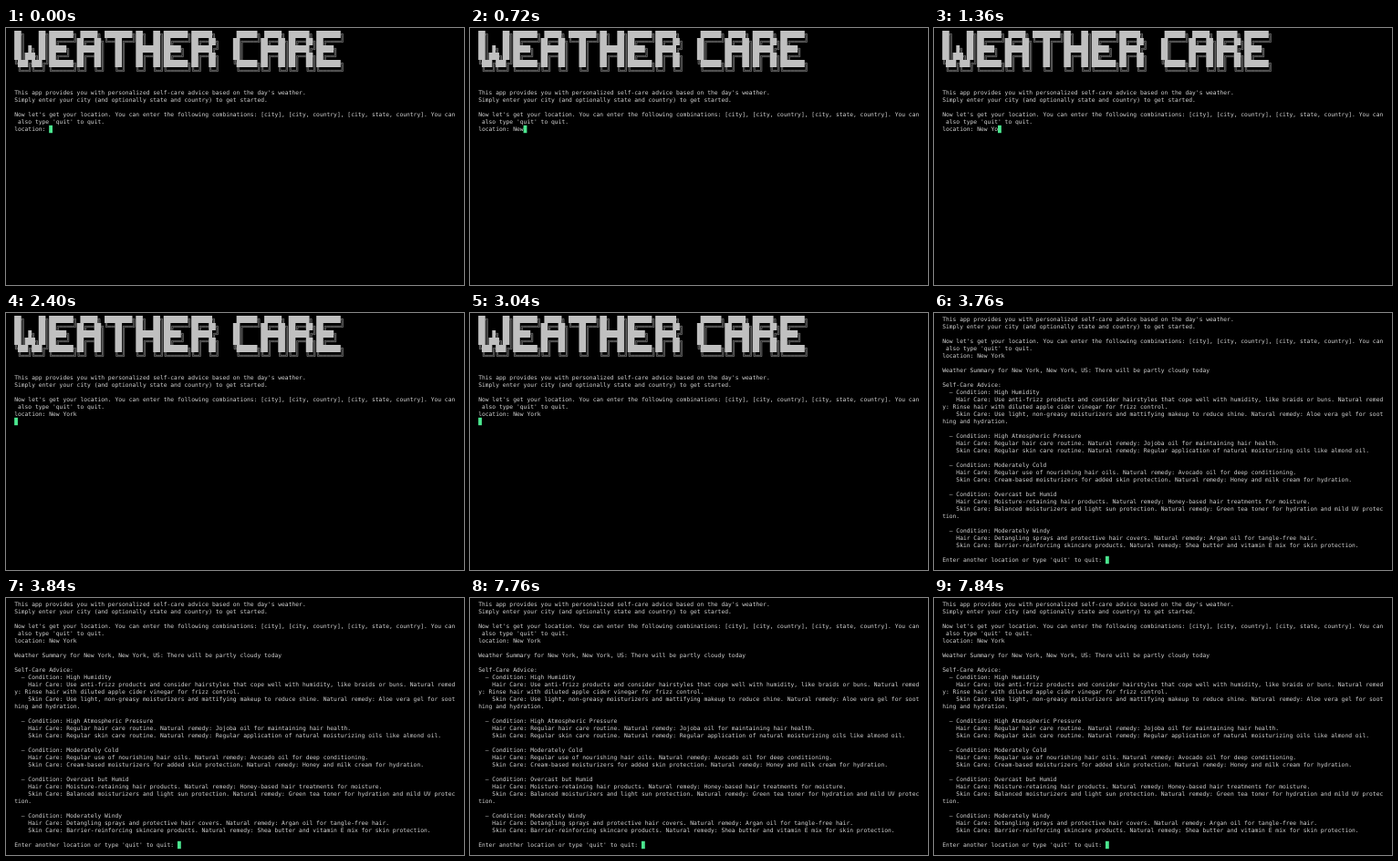
An HTML page with a canvas for the animation above (8.16 s loop, 502 by 282 pixels).

```html
<!DOCTYPE html>
<html lang="en">
<head>
<meta charset="utf-8">
<title>Weather Care</title>
<style>
html, body { margin: 0; width: 502px; height: 282px; overflow: hidden; background: #000; }
canvas { display: block; }
</style>
</head>
<body>
<canvas width="502" height="282"></canvas>
<script>
const LOOP = 8160, COLS = 127, ROWS = 34;
const LEFT = 9.13, TOP = 3, CELL_W = 3.805, CELL_H = 8, BASELINE = 6.2;

const intro = `██╗    ██╗███████╗ █████╗ ████████╗██╗  ██╗███████╗██████╗      ██████╗ █████╗ ██████╗ ███████╗
██║    ██║██╔════╝██╔══██╗╚══██╔══╝██║  ██║██╔════╝██╔══██╗    ██╔════╝██╔══██╗██╔══██╗██╔════╝
██║ █╗ ██║█████╗  ███████║   ██║   ███████║█████╗  ██████╔╝    ██║     ███████║██████╔╝█████╗
██║███╗██║██╔══╝  ██╔══██║   ██║   ██╔══██║██╔══╝  ██╔══██╗    ██║     ██╔══██║██╔══██╗██╔══╝
╚███╔███╔╝███████╗██║  ██║   ██║   ██║  ██║███████╗██║  ██║    ╚██████╗██║  ██║██║  ██║███████╗
 ╚══╝╚══╝ ╚══════╝╚═╝  ╚═╝   ╚═╝   ╚═╝  ╚═╝╚══════╝╚═╝  ╚═╝     ╚═════╝╚═╝  ╚═╝╚═╝  ╚═╝╚══════╝


This app provides you with personalized self-care advice based on the day's weather.
Simply enter your city (and optionally state and country) to get started.

Now let's get your location. You can enter the following combinations: [city], [city, country], [city, state, country]. You can also type 'quit' to quit.
location: `;

const advice = `
Weather Summary for New York, New York, US: There will be partly cloudy today

Self-Care Advice:
  – Condition: High Humidity
    Hair Care: Use anti-frizz products and consider hairstyles that cope well with humidity, like braids or buns. Natural remedy: Rinse hair with diluted apple cider vinegar for frizz control.
    Skin Care: Use light, non-greasy moisturizers and mattifying makeup to reduce shine. Natural remedy: Aloe vera gel for soothing and hydration.

  – Condition: High Atmospheric Pressure
    Hair Care: Regular hair care routine. Natural remedy: Jojoba oil for maintaining hair health.
    Skin Care: Regular skin care routine. Natural remedy: Regular application of natural moisturizing oils like almond oil.

  – Condition: Moderately Cold
    Hair Care: Regular use of nourishing hair oils. Natural remedy: Avocado oil for deep conditioning.
    Skin Care: Cream-based moisturizers for added skin protection. Natural remedy: Honey and milk cream for hydration.

  – Condition: Overcast but Humid
    Hair Care: Moisture-retaining hair products. Natural remedy: Honey-based hair treatments for moisture.
    Skin Care: Balanced moisturizers and light sun protection. Natural remedy: Green tea toner for hydration and mild UV protection.

  – Condition: Moderately Windy
    Hair Care: Detangling sprays and protective hair covers. Natural remedy: Argan oil for tangle-free hair.
    Skin Care: Barrier-reinforcing skincare products. Natural remedy: Shea butter and vitamin E mix for skin protection.

Enter another location or type 'quit' to quit: `;

// Output events: [time in ms, text]
const events = [[0, intro], [320, "N"], [640, "e"], [720, "w"], [800, " "], [1120, "Y"],
  [1360, "o"], [1520, "r"], [1600, "k"], [2400, "\n"], [3120, advice]];

// Directions of the two arms of each corner
const corners = { "╔": [1, 1], "╗": [-1, 1], "╚": [1, -1], "╝": [-1, -1] };

const ctx = document.querySelector("canvas").getContext("2d");
ctx.lineWidth = 0.5;

function wrap(line) {
  const parts = [];
  do {
    parts.push(line.slice(0, COLS));
    line = line.slice(COLS);
  } while (line);
  return parts;
}

function drawDoubleLine(char, x, y) {
  const w = CELL_W / 2, h = CELL_H / 2;
  for (const s of [-0.65, 0.65]) {
    if (char === "═") {
      ctx.moveTo(x - w, y + s);
      ctx.lineTo(x + w, y + s);
    } else if (char === "║") {
      ctx.moveTo(x + s, y - h);
      ctx.lineTo(x + s, y + h);
    } else {
      const [dx, dy] = corners[char];
      ctx.moveTo(x + dx * w, y + dy * s);
      ctx.lineTo(x + dx * s, y + dy * s);
      ctx.lineTo(x + dx * s, y + dy * h);
    }
  }
}

function drawBanner(row, top) {
  ctx.fillStyle = ctx.strokeStyle = "#c0c0c0";
  for (const run of row.matchAll(/█+/g))
    ctx.fillRect(LEFT + run.index * CELL_W, top, run[0].length * CELL_W, CELL_H);
  ctx.beginPath();
  for (const line of row.matchAll(/[═║╔╗╚╝]/g))
    drawDoubleLine(line[0], LEFT + (line.index + 0.5) * CELL_W, top + CELL_H / 2);
  ctx.stroke();
}

// A large font scaled down keeps the fractional column width.
function drawText(row, top) {
  ctx.save();
  ctx.scale(0.1, 0.1);
  ctx.font = "63.2px 'DejaVu Sans Mono', monospace";
  ctx.textRendering = "geometricPrecision";
  ctx.fillStyle = "#d4d4d4";
  ctx.fillText(row, LEFT * 10, (top + BASELINE) * 10);
  ctx.restore();
}

function draw(time) {
  const output = events.filter(([at]) => at <= time).map(([, text]) => text).join("");
  const rows = output.split("\n").flatMap(wrap).slice(-ROWS);

  ctx.fillStyle = "#000";
  ctx.fillRect(0, 0, 502, 282);

  rows.forEach((row, i) => (/[█═]/.test(row) ? drawBanner : drawText)(row, TOP + i * CELL_H));

  const last = rows.length - 1;
  ctx.fillStyle = "#4be78f";
  ctx.fillRect(LEFT + rows[last].length * CELL_W, TOP + last * CELL_H - 0.2, CELL_W, CELL_H + 0.4);
}

function tick() {
  draw(performance.now() % LOOP);
  requestAnimationFrame(tick);
}
tick();
</script>
</body>
</html>
```
